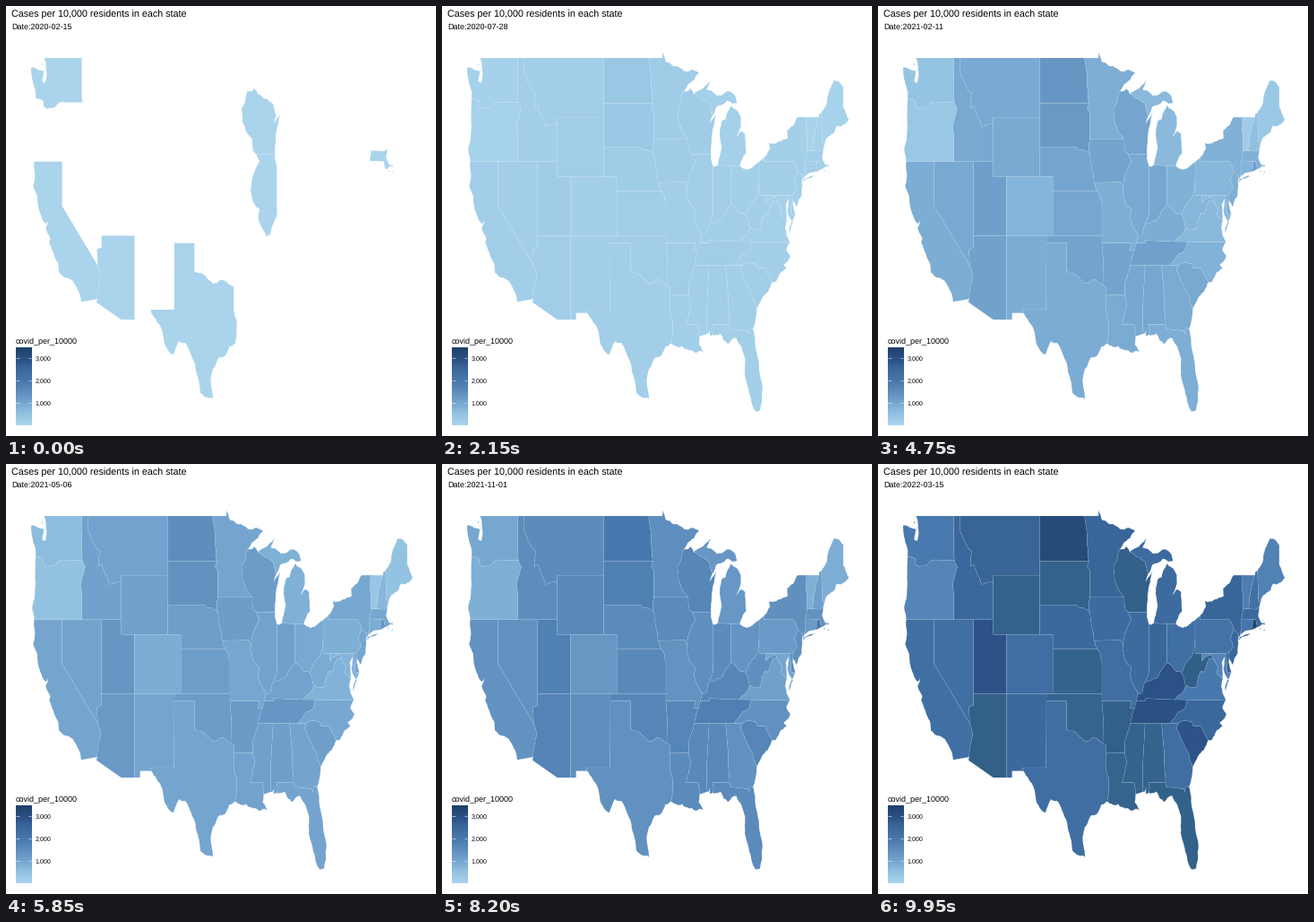
A matplotlib script that plays this animation: 480 px wide and 480 px high, repeating every 10000 ms.

```python
import numpy as np
import matplotlib
import matplotlib.pyplot as plt
from matplotlib.animation import FuncAnimation
from matplotlib.collections import PolyCollection
from matplotlib.colors import LinearSegmentedColormap

matplotlib.rcParams.update({"font.family": "Liberation Sans", "text.hinting": "none"})

SIZE, DPI = 480, 100
FRAMES, STEP = 200, 50
DAYS = 759
TOP = 3440  # highest value on the colour scale
FIRST_DAY = np.datetime64("2020-02-15")

rng = np.random.default_rng(4)
polys, owner, starts, levels = [], [], [], []


def at(*v):
    """Corners as degrees west + i * degrees north."""
    return [complex(w, n) for w, n in zip(v[::2], v[1::2])]


def wild(*v):
    """A natural line: key points joined by seeded midpoint displacement."""
    line = at(*v)
    for _ in range(3):
        mids = [(a + b) / 2 + (b - a) * 1j * rng.uniform(-0.09, 0.09)
                for a, b in zip(line, line[1:])]
        line = [p for pair in zip(line, mids) for p in pair] + line[-1:]
    return line


def box(west, east, north, south):
    return at(west, north, east, north, east, south, west, south)


def autumn_share(place):
    """Part of the first winter's total reached by November, highest on the northern plains."""
    return 0.39 + 0.28 * np.exp(-((place.real - 99) / 8) ** 2 - ((place.imag - 45.5) / 4) ** 2)


def state(start, winter, last, *parts):
    """Add a state: day of first case, totals after the first winter and at the end, outlines."""
    for part in parts:
        z = np.array(part)
        polys.append(np.column_stack([143.5 + 7.38 * (109.05 - z.real),
                                      58 + 16.53 * (49 - z.imag)]))
        owner.append(len(starts))
    starts.append(start)
    levels.append((0, winter * autumn_share(np.mean(parts[0])), winter, last))


# Borders shared by two states
COLUMBIA = at(116.92, 45.99, 118.98, 46) + wild(118.98, 46, 121.2, 45.67, 122.25, 45.55,
                                                122.75, 45.65, 122.85, 46.08, 124, 46.26)
SNAKE = wild(116.92, 45.99, 116.48, 45.55, 117.2, 44.42, 117.03, 43.83) + at(117.03, 42)
COLORADO = wild(114.72, 32.72, 114.5, 33.6, 114.14, 34.28, 114.63, 35)
MEAD = at(114.63, 35, 114.73, 36.1, 114.04, 36.2)
ID_MT = at(116.05, 49, 116.05, 47.98) + wild(
    116.05, 47.98, 114.75, 46.75, 114.35, 46.65, 114.55, 45.57, 113.95, 45.7, 112.85, 44.38,
    111.5, 44.55, 111.05, 44.48)
RED_N = wild(97.23, 49, 96.85, 47.6, 96.56, 45.94)
SD_MN = at(96.56, 45.94, 96.85, 45.6, 96.45, 45.3, 96.45, 43.5)
SIOUX = wild(96.45, 43.5, 96.6, 43.2, 96.45, 42.49)
SD_NE = wild(96.45, 42.49, 97.9, 42.8, 98.5, 43) + at(104.05, 43)
NE_IA = wild(96.45, 42.49, 95.9, 41.1, 95.77, 40.58)
NE_MO = wild(95.77, 40.58, 95.31, 40)
KS_MO = wild(95.31, 40, 94.9, 39.75, 94.62, 39.15) + at(94.62, 37)
RED_S = wild(94.48, 33.64, 95.2, 33.9, 97.2, 33.75, 98.1, 34.13, 100, 34.56) + at(
    100, 36.5, 103.04, 36.5)
SABINE = at(94.04, 33.02, 94.04, 32) + wild(94.04, 32, 93.55, 31.18, 93.85, 29.7)
MN_WI = wild(92.05, 46.7, 92.29, 46.1, 92.85, 45.6, 92.75, 44.75, 91.22, 43.5)
IA_WI = wild(91.22, 43.5, 91.1, 42.7, 90.64, 42.51)
IA_IL = wild(90.64, 42.51, 90.15, 42, 91, 41.2, 91.42, 40.38)
MO_IL = wild(91.42, 40.38, 91.5, 40, 90.7, 38.95, 90.15, 38.8, 90.35, 38.2, 89.5, 37.3,
             89.17, 36.99)
MO_TN = wild(89.42, 36.5, 89.7, 36)
AR_TN = wild(89.7, 36, 90.3, 35)
AR_MS = wild(90.3, 35, 91.1, 33.9, 91.15, 33)
LA_MS = wild(91.15, 33, 90.9, 32.35, 91.6, 31) + wild(89.73, 31, 89.55, 30.2)
MS_AL = at(88.2, 35, 88.1, 34.9, 88.47, 31.9, 88.4, 30.37)
AL_GA = at(85.6, 35, 85.18, 32.87) + wild(85.18, 32.87, 85.05, 31.55, 85, 31)
AL_FL = at(85, 31, 87.6, 31, 87.4, 30.65, 87.5, 30.3)
GA_FL = at(85, 31, 84.86, 30.7, 82.2, 30.57, 82.05, 30.36, 82, 30.75, 81.45, 30.7)
GA_SC = wild(83.1, 35, 83.35, 34.7, 81.5, 33, 80.9, 32.05)
NC_SC = at(83.1, 35, 82.3, 35.2, 81.05, 35.1, 80.8, 34.82, 79.67, 34.8, 78.55, 33.86)
NC_TN = wild(81.68, 36.59, 82, 36.1, 83.1, 35.75, 84.3, 35)
KY_TN = at(89.42, 36.5, 88.07, 36.5, 88.07, 36.68, 83.68, 36.6)
KY_IL = wild(89.17, 36.99, 88.5, 37.1, 88.05, 37.8)
KY_IN = wild(88.05, 37.8, 86.5, 38, 85.4, 38.73, 84.82, 39.1)
KY_OH = wild(84.82, 39.1, 83.7, 38.65, 82.59, 38.42)
KY_WV = wild(82.59, 38.42, 81.97, 37.54)
KY_VA = wild(81.97, 37.54, 83.68, 36.6)
IL_IN = at(87.53, 41.7, 87.53, 39.35) + wild(87.53, 39.35, 87.5, 38.5, 88.05, 37.8)
OH_WV = wild(80.52, 40.64, 80.85, 39.7, 81.7, 39.2, 82.59, 38.42)
WV_MD = at(79.48, 39.72, 79.48, 39.2) + wild(79.48, 39.2, 78.2, 39.68, 77.72, 39.32)
WV_VA = at(77.72, 39.32, 78.35, 39.4) + wild(78.35, 39.4, 79.3, 38.42, 79.65, 38.55, 80.3, 37.5,
                                             81.97, 37.54)
POTOMAC = wild(77.72, 39.32, 77.05, 38.8, 77.3, 38.4, 76.35, 38)
DELAWARE = wild(74.7, 41.36, 75.2, 40.7, 74.75, 40.2, 75.4, 39.8)
PA_NY = at(79.76, 42.27, 79.76, 42, 75.35, 42) + wild(75.35, 42, 74.7, 41.36)
NY_VT = at(73.35, 45, 73.4, 44, 73.25, 43.6, 73.25, 42.75)
NY_CT = at(73.5, 42.05, 73.5, 41.3, 73.73, 41.1, 73.65, 41)
VT_NH = wild(71.5, 45, 72.05, 44.1, 72.45, 42.73)
NH_MA = at(72.45, 42.73, 71.3, 42.7, 70.82, 42.87)
NH_ME = at(71.08, 45.3, 70.98, 43.4, 70.7, 43.07)
WI_MI = wild(90.4, 46.55, 88.1, 45.9, 87.6, 45.1)

# West
state(0, 430, 1920,
      at(122.75, 49, 117.03, 49, 117.03, 46.42) + COLUMBIA
      + wild(124, 46.26, 124.05, 46.8, 124.65, 47.9, 124.7, 48.35, 123.2, 48.15, 122.75, 48.1,
             123, 47.4, 122.6, 47.3, 122.35, 47.95, 122.5, 48.7, 122.75, 49),
      wild(122.7, 48.35, 122.4, 47.95, 122.6, 48.1),
      wild(123.1, 48.6, 122.85, 48.6, 123, 48.45))
state(13, 355, 1670,
      COLUMBIA + wild(124, 46.26, 124.07, 44.6, 124.2, 43.4, 124.55, 42.84, 124.22, 42)
      + SNAKE[::-1])
state(0, 870, 2280,
      at(120, 42) + wild(124.22, 42, 124.1, 41, 124.4, 40.4, 123.8, 39.7, 123.6, 38.9, 122.5, 37.8,
                         122.1, 38.05, 122.5, 37.5, 121.8, 36.85, 121.95, 36.5, 120.65, 35.15,
                         120.5, 34.5, 119.25, 34.15, 118.4, 33.95, 118, 33.65, 117.25, 32.9,
                         117.12, 32.53) + COLORADO + at(120, 39))
state(19, 930, 2260, at(120, 39, 120, 42, 114.04, 42) + MEAD[::-1])
state(0, 1080, 2740,
      at(114.04, 37, 109.05, 37, 109.05, 31.33, 111.07, 31.33, 114.81, 32.5) + COLORADO + MEAD)
state(10, 1120, 2890, box(114.04, 111.05, 42, 37)[:2] + box(111.05, 109.05, 41, 37)[:3]
      + at(114.04, 37))
state(27, 940, 2470, at(117.03, 49) + ID_MT + at(111.05, 42) + SNAKE[::-1] + at(117.03, 46.42))
state(27, 910, 2560, ID_MT + at(111.05, 45, 104.05, 45, 104.05, 49))
state(25, 920, 2690, box(111.05, 104.05, 45, 41))
state(19, 710, 2290, box(109.05, 102.05, 41, 37))
state(25, 860, 2460, at(109.05, 37, 103, 37, 103.06, 32, 106.62, 32, 106.53, 31.78,
                        108.21, 31.78, 108.21, 31.33, 109.05, 31.33))

# Plains
state(25, 1290, 3130, RED_N + at(104.05, 45.94, 104.05, 49))
state(24, 1245, 2680, at(104.05, 45.94) + SD_MN + SIOUX + SD_NE)
state(2, 1010, 2450, SD_NE[::-1] + NE_IA + NE_MO + at(102.05, 40, 102.05, 41, 104.05, 41))
state(21, 980, 2640, KS_MO + at(102.05, 37, 102.05, 40))
state(20, 1040, 2610, at(103, 37, 94.62, 37, 94.62, 36.5, 94.43, 35.39) + RED_S)
state(0, 880, 2300,
      RED_S[::-1] + at(94.04, 33.55) + SABINE
      + wild(93.85, 29.7, 94.7, 29.5, 95.2, 29, 96.4, 28.7, 97.2, 28, 97.55, 27.3, 97.4, 26.7,
             97.17, 25.96)
      + wild(97.17, 25.96, 99.1, 26.4, 99.5, 27.5, 100.65, 29.1, 101.4, 29.77, 102.3, 29.88,
             103.15, 28.98, 104.5, 29.65, 104.9, 30.6, 106.53, 31.78)
      + at(106.62, 32, 103.06, 32))

# Midwest
state(20, 840, 2530,
      at(95.15, 49, 95.15, 49.38) + wild(95.15, 49.38, 94.65, 48.75, 92.4, 48.3, 91.4, 48.07,
                                         89.6, 48, 91.3, 47.2, 92.05, 46.7)
      + MN_WI + SD_MN[::-1] + RED_N[::-1])
state(22, 1040, 2390, IA_WI + IA_IL + at(91.73, 40.61) + NE_IA[::-1] + SIOUX[::-1])
state(21, 830, 2290,
      at(91.73, 40.61) + MO_IL + MO_TN + at(90.37, 36, 90.15, 36.5, 94.62, 36.5)
      + KS_MO[::-1] + NE_MO[::-1])
state(0, 1010, 2710,
      wild(92.05, 46.7, 90.9, 46.95, 90.4, 46.55) + WI_MI
      + wild(87.6, 45.1, 88, 44.55, 86.95, 45.25, 87.7, 43.7, 87.8, 42.5)
      + IA_WI[::-1] + MN_WI[::-1])
state(0, 910, 2400,
      at(87.8, 42.5, 87.82, 42.2) + IL_IN + KY_IL[::-1] + MO_IL[::-1] + IA_IL[::-1])
state(20, 950, 2510,
      at(87.2, 41.65, 86.8, 41.76, 84.81, 41.72) + KY_IN[::-1] + IL_IN[::-1])
state(23, 790, 2280,
      at(84.81, 41.72) + wild(83.45, 41.73, 82.7, 41.5, 81.9, 41.5, 80.52, 41.98)
      + OH_WV + KY_OH[::-1])
state(24, 640, 2380,
      WI_MI[::-1] + wild(90.4, 46.55, 89.2, 46.9, 87.9, 47.47, 88.45, 46.85, 86.8, 46.45,
                         85, 46.75, 84.1, 46.4, 83.9, 45.97, 85.5, 46.08, 87, 45.7, 87.6, 45.1),
      at(86.8, 41.76, 84.81, 41.72)
      + wild(83.45, 41.73, 82.5, 42.6, 82.65, 43.85, 83.2, 44.05, 83.9, 43.65, 83.3, 44.4,
             83.3, 45, 84.75, 45.78, 85.6, 44.85, 86.2, 44.7, 86.5, 43.75, 86.2, 42.9,
             86.8, 41.76))

# South
state(25, 1030, 2730,
      at(94.62, 36.5, 90.15, 36.5, 90.37, 36) + AR_TN + AR_MS
      + at(94.04, 33.02, 94.04, 33.55, 94.48, 33.64, 94.43, 35.39))
state(23, 900, 2620,
      LA_MS + wild(89.55, 30.2, 89.65, 29.65, 89, 29.15, 90.2, 29.1, 91.3, 29.3, 92.2, 29.55,
                   93.85, 29.7) + SABINE[::-1])
state(25, 950, 2660, MS_AL + LA_MS[::-1] + AR_MS[::-1])
state(27, 970, 2640, AL_GA + AL_FL + at(88, 30.23, 87.95, 30.65, 88.1, 30.4) + MS_AL[::-1])
state(15, 840, 2720,
      GA_FL + wild(81.45, 30.7, 80.95, 29.2, 80.55, 28.3, 80.03, 26.8, 80.1, 25.8, 80.4, 25.2)
      + wild(80.4, 25.2, 81.1, 25.13, 81.75, 25.95, 82.7, 27.6, 82.65, 28.7, 84, 30.1, 85.3, 29.7,
             86.4, 30.38, 87.5, 30.3) + AL_FL[::-1])
state(16, 890, 2290, GA_SC + wild(80.9, 32.05, 81.45, 30.7) + GA_FL[::-1] + AL_GA[::-1])
state(20, 940, 2860, NC_SC + wild(78.55, 33.86, 79.2, 33.2, 80.9, 32.05) + GA_SC[::-1])
state(17, 780, 2490,
      NC_SC + wild(78.55, 33.86, 77.95, 33.9, 77.3, 34.5, 76.4, 34.8, 76.8, 35.05, 75.8, 35.6,
                   76.4, 36.05, 75.87, 36.55) + NC_TN)
state(19, 1110, 2960, KY_TN + NC_TN + at(88.2, 35) + AR_TN[::-1])
state(20, 860, 2920, KY_IL + KY_IN + KY_OH + KY_WV + KY_VA + KY_TN[::-1])
state(31, 700, 2770, at(80.52, 39.72) + WV_MD + WV_VA + KY_WV[::-1] + OH_WV[::-1])
state(21, 640, 1940,
      POTOMAC + wild(76.35, 38, 76.6, 37.5, 76.35, 37, 75.87, 36.55) + at(81.68, 36.59)
      + KY_VA[::-1] + WV_VA[::-1],
      wild(75.6, 37.95, 75.4, 37.9, 75.95, 37.15, 75.95, 37.55))
state(19, 610, 1680,
      at(75.79, 39.72, 75.7, 38.46, 75.05, 38.45)
      + wild(75.05, 38.45, 75.6, 37.95, 76.25, 38.7, 76.05, 39.5, 76.5, 39.1, 76.35, 38)
      + POTOMAC[::-1] + WV_MD[::-1])

# Northeast
state(25, 840, 2640,
      at(75.79, 39.72) + wild(75.4, 39.8, 75.45, 39.1, 75.05, 38.45) + at(75.7, 38.46))
state(20, 690, 2160,
      at(80.52, 41.98) + PA_NY + DELAWARE + at(75.79, 39.72, 80.52, 39.72))
state(18, 830, 2470,
      at(73.9, 41) + wild(74.05, 40.65, 74, 40.4, 74.1, 39.75, 74.9, 38.95, 75.5, 39.5)
      + DELAWARE[::-1])
state(15, 790, 2530,
      wild(79.76, 42.27, 78.9, 42.85, 79.05, 43.27, 76.2, 43.6, 76.3, 44.1, 74.7, 45)
      + NY_VT + NY_CT + at(73.95, 40.75, 73.9, 41) + PA_NY[::-1],
      wild(74, 40.6, 73.7, 40.85, 72.4, 41.05, 71.9, 41.05, 74, 40.6))
state(22, 740, 2060, at(71.8, 42.02, 71.85, 41.32, 72.9, 41.25) + NY_CT[::-1])
state(15, 1140, 3430, at(71.8, 42.02, 71.38, 42.02, 71.12, 41.5, 71.85, 41.32))
state(0, 790, 2420,
      at(73.25, 42.75) + NH_MA
      + wild(70.82, 42.87, 71, 42.3, 70.5, 41.78, 70.05, 41.8, 70.2, 42.07, 69.95, 41.67,
             70.65, 41.6, 71.12, 41.5) + at(71.38, 42.02, 73.5, 42.05),
      wild(70.8, 41.4, 70.5, 41.42, 70.65, 41.33),
      wild(70.2, 41.3, 70.05, 41.36, 69.97, 41.25))
state(21, 215, 1850, VT_NH + NY_VT[::-1])
state(16, 520, 2210, at(71.4, 45.23) + NH_ME + NH_MA[::-1] + VT_NH[::-1])
state(26, 315, 1750,
      wild(71.08, 45.3, 70.3, 45.9, 70, 46.7) + at(69.23, 47.46)
      + wild(69.23, 47.46, 68.3, 47.35, 67.8, 47.07) + at(67.8, 45.7)
      + wild(67.8, 45.7, 66.97, 44.82, 68.8, 44.4, 69.1, 44, 70.25, 43.65, 70.7, 43.07)
      + NH_ME[::-1])


def national(day):
    """Nationwide cases per 10,000 as a sum of waves: (size, middle day, spread)."""
    waves = ((60, 75, 15), (130, 155, 18), (690, 310, 24),
             (130, 430, 20), (430, 575, 24), (960, 700, 9))
    return sum(size / (1 + np.exp((middle - day) / spread)) for size, middle, spread in waves)


KEY_TOTALS = [national(day) for day in (0, 274, 362, DAYS)]

STOPS = [(0, "#aad4ec"), (500, "#92c1e1"), (900, "#7aabd3"), (1300, "#6796c4"),
         (1600, "#5888b8"), (1950, "#4879ae"), (2300, "#406ea2"), (2540, "#396699"),
         (2850, "#2d538b"), (3150, "#254a78"), (TOP, "#1f416b")]
TEAL = [(2620, "#35648f"), (2770, "#315f88")]


def ramp(stops):
    return LinearSegmentedColormap.from_list("", [(v / TOP, c) for v, c in sorted(stops)], N=1024)


map_ramp = ramp(STOPS + TEAL)
owner = np.array(owner)
first_frame = np.round(np.array(starts) * (FRAMES - 1) / DAYS)

fig = plt.figure(figsize=(SIZE / DPI, SIZE / DPI), dpi=DPI, facecolor="white")
ax = fig.add_axes([0, 0, 1, 1])
ax.axis("off")

land = PolyCollection(polys, linewidths=0.2, edgecolors=(1, 1, 1, 0.25), snap=False)
ax.add_collection(land)


def label(x, y, text, px):
    return ax.text(x, y, text, fontsize=px * 72 / DPI, color="black", va="baseline")


label(6.5, 13, "Cases per 10,000 residents in each state", 10.8)
date = label(6.5, 26, "", 9)
label(11, 377, "covid_per_10000", 9)

ax.imshow(np.linspace(1, 0, 86)[:, None], cmap=ramp(STOPS), vmin=0, vmax=1,
          extent=(11, 28.3, 468.4, 382), aspect="auto")
for value in (1000, 2000, 3000):
    y = 468.3 - value * 0.025
    ax.hlines([y, y], [11, 24.8], [14.5, 28.3], color="white", lw=0.4)
    label(32.8, y + 2.6, f"{value:,}", 7.2)

ax.set_xlim(0, SIZE)
ax.set_ylim(SIZE, 0)


def draw(i):
    day = DAYS * i / (FRAMES - 1)
    values = np.array([np.interp(national(day), KEY_TOTALS, level) for level in levels])
    faces = map_ramp(values[owner] / TOP)
    faces[:, 3] = (i >= first_frame)[owner]
    land.set_facecolor(faces)
    date.set_text(f"Date:{FIRST_DAY + int(day + 1e-6)}")
    return land, date


anim = FuncAnimation(fig, draw, frames=FRAMES, interval=STEP, repeat=True)
plt.show()
```
